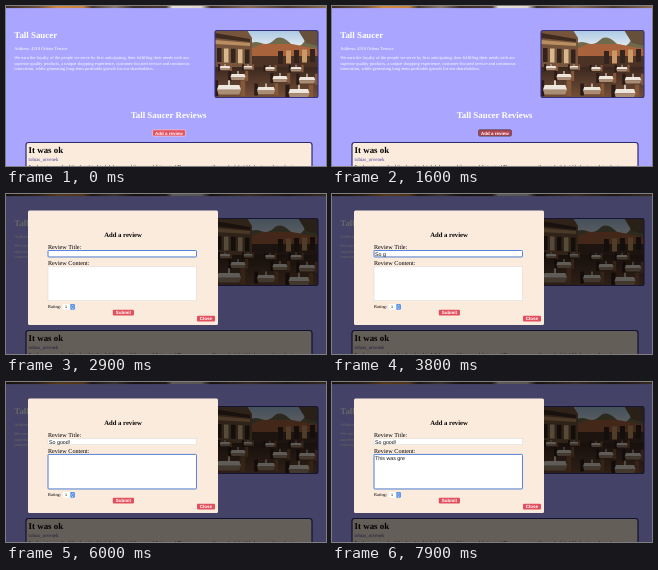
Recreate the animation shown at these times as an HTML page. Size 320 px wide and 160 px high, loop 8000 ms.

```html
<!DOCTYPE html>
<html lang="en">
<head>
<meta charset="utf-8">
<title>Add a review</title>
<style>
  html, body { margin: 0; width: 100%; height: 100%; overflow: hidden; background: #aaa6ff; }
  svg { display: block; width: 100vw; height: 100vh; }
  text { font: 4.45px "Liberation Serif", "Times New Roman", serif; text-rendering: geometricPrecision; white-space: pre; }
  .white { fill: #fff; }
  .h1 { font-size: 8.9px; font-weight: bold; }
  .h2 { font-size: 6.67px; font-weight: bold; }
  .label { font-size: 6.15px; }
  .mid { text-anchor: middle; }
  .btn { font: bold 4.5px "Liberation Sans", Arial, sans-serif; fill: #fff; text-anchor: middle; }
  .typed { font: 5.3px "Liberation Sans", Arial, sans-serif; fill: #111; }
  .red { fill: #e2505f; }
  .field { fill: #fff; stroke: #d3cdc8; stroke-width: .4; }
  .ring { fill: none; stroke: #5585d8; stroke-width: 1; }
</style>
</head>
<body>
<svg viewBox="0 0 320 160" preserveAspectRatio="none">
  <defs>
    <linearGradient id="banner">
      <stop offset="0" stop-color="#3a2c26"/>
      <stop offset=".1" stop-color="#6f5038"/>
      <stop offset=".16" stop-color="#d08a3e"/>
      <stop offset=".24" stop-color="#c9853f"/>
      <stop offset=".27" stop-color="#4a382f"/>
      <stop offset=".34" stop-color="#8d7a6c"/>
      <stop offset=".4" stop-color="#3b2d28"/>
      <stop offset=".5" stop-color="#4c3a31"/>
      <stop offset=".52" stop-color="#e6dfd8"/>
      <stop offset=".61" stop-color="#e0d6cb"/>
      <stop offset=".64" stop-color="#3b2d28"/>
      <stop offset=".76" stop-color="#8a6b54"/>
      <stop offset=".88" stop-color="#4a382f"/>
      <stop offset="1" stop-color="#8a6b4f"/>
    </linearGradient>
    <linearGradient id="sky" x2="0" y2="1">
      <stop offset="0" stop-color="#a9c8e4"/>
      <stop offset="1" stop-color="#edf0f2"/>
    </linearGradient>
    <linearGradient id="floor" x2="0" y2="1">
      <stop offset="0" stop-color="#3a271e"/>
      <stop offset="1" stop-color="#755038"/>
    </linearGradient>
    <clipPath id="frame"><rect x="209" y="24.5" width="103" height="67" rx="2"/></clipPath>
  </defs>

  <rect width="320" height="160" fill="#aaa6ff"/>
  <rect width="320" height="2.1" fill="url(#banner)"/>

  <g class="white">
    <text class="h1" x="8.3" y="32">Tall Saucer</text>
    <text x="8.3" y="44.4">Address: 4318 Orlena Terrace</text>
    <text x="8.3" y="53.4">We earn the loyalty of the people we serve by first anticipating, then fulfilling their needs with our</text>
    <text x="8.3" y="58.5">superior-quality products, a unique shopping experience, customer-focused service and continuous</text>
    <text x="8.3" y="63.6">innovation, while generating long-term profitable growth for our shareholders.</text>
    <text class="h1 mid" x="162.6" y="112.2">Tall Saucer Reviews</text>
  </g>

  <g clip-path="url(#frame)">
    <rect x="209" y="24" width="103" height="68" fill="#4a3227"/>
    <rect x="236" y="24" width="76" height="20" fill="url(#sky)"/>
    <path d="M240 39q8-5 15-2t13-3 16 3 16-5 12 3v14h-72z" fill="#6f6a4b"/>
    <path d="M246 42l10-4h30l26 5v16h-66z" fill="#a8623c"/>
    <path d="M246 50h66v10h-66z" fill="#4b3225"/>
    <path d="M209 24h32l5 8v30h-37z" fill="#77553c"/>
    <path d="M209 27l35 6v3l-35-4z" fill="#3f2a20"/>
    <path d="M209 34l35 3v3l-35-2z" fill="#b98f62"/>
    <path d="M292 24h20v16l-12-3z" fill="#66503c"/>
    <g id="windows"></g>
    <path d="M209 61h103v31H209z" fill="url(#floor)"/>
    <g id="tables"></g>
  </g>
  <rect x="209" y="24.5" width="103" height="67" rx="2" fill="none" stroke="#34327f" stroke-width="1.1"/>

  <rect id="open" x="146.6" y="123.8" width="32.8" height="6.3" rx="1.2" stroke-width=".8"/>
  <text class="btn" x="163" y="128.6">Add a review</text>

  <rect x="20" y="136.5" width="286" height="40" rx="2.5" fill="#fbebdd" stroke="#2b2a70" stroke-width="1.2"/>
  <text class="h1" x="22.6" y="147">It was ok</text>
  <text x="22.6" y="155" style="font-size:4.9px" fill="#45409c">tobias_orvenek</text>
  <text x="22.6" y="162.4">For dessert, we ordered the chocolate drizzled churros and they were delicious too! They were warm with some fresh fruit blueberries and strawberries</text>

  <g id="modal">
    <rect width="320" height="160" fill="#000" opacity=".6"/>
    <rect x="22" y="16.5" width="190" height="114.5" rx="1.5" fill="#fbebdd"/>
    <text class="h2 mid" x="117" y="43.2">Add a review</text>
    <text class="label" x="42" y="54.8">Review Title:</text>
    <rect class="field" x="42" y="56.5" width="148.5" height="6.3"/>
    <rect class="ring" id="titleRing" x="42" y="56.5" width="148.5" height="6.5" rx=".8"/>
    <text class="typed" id="title" x="43" y="61.6"></text>
    <text class="label" x="42" y="71">Review Content:</text>
    <rect class="field" x="42" y="72.4" width="148.5" height="34.4"/>
    <rect class="ring" id="bodyRing" x="42" y="72.4" width="148.5" height="34.6" rx=".8"/>
    <text class="typed" id="body" x="43" y="77.9"></text>
    <text x="42" y="114">Rating:</text>
    <rect x="57" y="110" width="12" height="5.8" rx="1.2" fill="#fff"/>
    <path d="M64.3 110h3.5q1.2 0 1.2 1.2v3.4q0 1.2-1.2 1.2h-3.5z" fill="#5b92e6"/>
    <path d="M65.6 112.4l1-1.2 1 1.2M65.6 113.5l1 1.2 1-1.2" fill="none" stroke="#fff" stroke-width=".5"/>
    <text x="59" y="114.3" style="font:3.7px 'Liberation Sans',Arial,sans-serif">1</text>
    <rect class="red" x="106.8" y="115.8" width="21.2" height="5.8" rx="1"/>
    <text class="btn" x="117.4" y="120.3">Submit</text>
    <rect class="red" x="191" y="121.8" width="18" height="5.8" rx="1"/>
    <text class="btn" x="200" y="126.3">Close</text>
  </g>
</svg>
<script>
const LOOP = 8000;
const HOVER = 1300, OPEN = 1700, TITLE_FOCUS = 2900, BODY_FOCUS = 5400;
const $ = id => document.getElementById(id);

// Key press times, one per character
const typing = {
  title: ["So good!", [3300, 3500, 3700, 3800, 4000, 4200, 4700, 4900]],
  body: ["This was gre", [6100, 6300, 6500, 6700, 6800, 6900, 7000, 7300, 7400, 7500, 7700, 7900]]
};

function add(parent, d, fill) {
  const p = document.createElementNS("http://www.w3.org/2000/svg", "path");
  p.setAttribute("d", d);
  p.setAttribute("fill", fill);
  $(parent).append(p);
}

for (let i = 0; i < 5; i++) {
  add("windows", `M${211 + i * 7} ${42 + i * .4}h4.5v14h-4.5z`, i % 2 ? "#d9b98c" : "#33231c");
  add("windows", `M${272 + i * 8} ${45 - i * .5}h5v13h-5z`, i % 2 ? "#c99a68" : "#33241d");
}

// A dining table with two chairs and a glass
function table(x, y, s) {
  const w = 13 * s, h = 3 * s;
  add("tables", `M${x - w * .75} ${y - 3 * s}h${3 * s}v${10 * s}h${-3 * s}z`, "#2a1b16");
  add("tables", `M${x + w * .55} ${y - 3 * s}h${3 * s}v${10 * s}h${-3 * s}z`, "#85583a");
  add("tables", `M${x - w / 2} ${y}h${w}l${s} ${h}h${-w - 2 * s}z`, "#eee6dc");
  add("tables", `M${x - w / 2 - s} ${y + h}h${w + 2 * s}l${-s} ${h}h${-w}z`, "#a98d74");
  add("tables", `M${x - s / 2} ${y - 3 * s}h${s}v${4 * s}h${-s}z`, "#f6f2ec");
}
[[219, 60, .7], [242, 60, .6], [264, 61, .65], [290, 61, .75],
 [232, 68, 1], [274, 70, 1], [301, 71, 1.1], [223, 79, 1.6], [260, 81, 1.2], [293, 83, 1.4]]
  .forEach(t => table(...t));

function show(id, on) {
  $(id).style.display = on ? "" : "none";
}

function draw(t) {
  const hover = t >= HOVER;
  $("open").style.fill = hover ? "#b2434f" : "#e2505f";
  $("open").style.stroke = hover ? "#4e4656" : "#efc3d6";
  show("modal", t >= OPEN);
  show("titleRing", t >= TITLE_FOCUS && t < BODY_FOCUS);
  show("bodyRing", t >= BODY_FOCUS);
  for (const id in typing) {
    const [text, keys] = typing[id];
    $(id).textContent = text.slice(0, keys.filter(k => k <= t).length);
  }
}

const start = performance.now();
function tick() {
  draw((performance.now() - start) % LOOP);
  requestAnimationFrame(tick);
}
tick();
</script>
</body>
</html>
```
